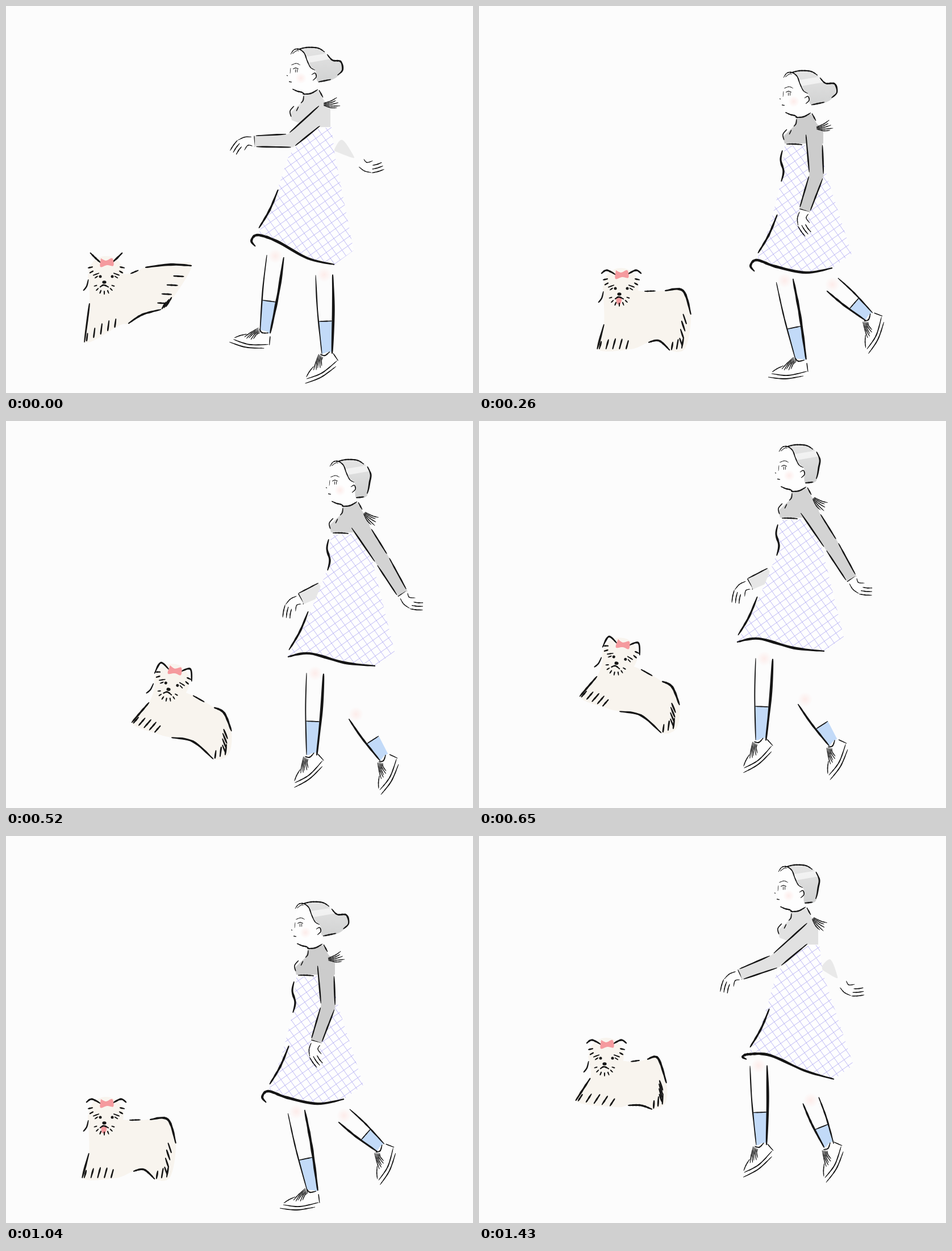
An HTML page with a canvas for the animation above (1.56 s loop, 822x681 px).

```html
<!DOCTYPE html>
<html lang="en">
<head>
<meta charset="utf-8">
<title>Walk</title>
<style>
html, body { margin: 0; width: 100%; height: 100%; overflow: hidden; background: #fcfcfc; }
canvas { display: block; width: 100vw; height: 100vh; }
</style>
</head>
<body>
<canvas width="822" height="681"></canvas>
<script>
const g = document.querySelector('canvas').getContext('2d');
const BLACK = '#151515', SKIN = '#fefefe', FUR = '#f8f4ee', PINK = '#f59a9e';
const RAD = Math.PI / 180;
const lerp = (a, b, t) => a + (b - a) * t;
const mix = (p, q, t) => [lerp(p[0], q[0], t), lerp(p[1], q[1], t)];
const add = (p, x, y) => [p[0] + x, p[1] + y];
const gray = v => `rgb(${v},${v},${v})`;

function at([x, y], deg, draw) {
  g.save();
  g.translate(x, y);
  g.rotate(deg * RAD);
  draw();
  g.restore();
}

// Catmull-Rom samples through the points
function spline(p, n = 9) {
  const get = i => p[Math.max(0, Math.min(p.length - 1, i))], out = [p[0]];
  for (let i = 0; i < p.length - 1; i++) {
    const [a, b, c, d] = [-1, 0, 1, 2].map(k => get(i + k));
    for (let k = 1; k <= n; k++) {
      const t = k / n;
      out.push([0, 1].map(j => b[j] + .5 * t * (c[j] - a[j] + t * (2 * a[j] - 5 * b[j] + 4 * c[j] - d[j]
        + t * (3 * (b[j] - c[j]) + d[j] - a[j])))));
    }
  }
  return out;
}

// Points at half a width to one side of a path
function side(pts, widths, s) {
  return pts.map(([x, y], i) => {
    const [ax, ay] = pts[Math.max(0, i - 1)], [bx, by] = pts[Math.min(pts.length - 1, i + 1)];
    const h = s * widths[i] / 2 / (Math.hypot(bx - ax, by - ay) || 1);
    return [x - (by - ay) * h, y + (bx - ax) * h];
  });
}

function fill(pts, color) {
  g.beginPath();
  pts.forEach(p => g.lineTo(...p));
  g.closePath();
  g.fillStyle = color;
  g.fill();
}

const blob = (pts, color) => fill(spline([...pts, pts[0]]), color);

// One tapered, slightly rough brush stroke
function ink(w, ...pts) {
  const p = spline(pts), last = p.length - 1;
  const widths = p.map((q, i) =>
    w * (.4 + .65 * Math.sin(Math.PI * i / last) ** .6) * (1 + .12 * Math.sin(i * 12.9 + q[0])));
  fill([...side(p, widths, 1), ...side(p, widths, -1).reverse()], BLACK);
}

function dot(x, y, rx, ry, color) {
  g.beginPath();
  g.ellipse(x, y, rx, ry, 0, 0, 7);
  g.fillStyle = color;
  g.fill();
}

function blush(x, y, r) {
  const c = g.createRadialGradient(x, y, 0, x, y, r);
  c.addColorStop(0, '#fdecea');
  c.addColorStop(1, '#fdecea00');
  dot(x, y, r, r, c);
}

// ---- the woman ----

// Back of the hair: hanging x y, blown x y
const LOCK = [[56, -28, 54, -28], [62, -14, 64, -18], [60, 0, 80, -17],
  [58, 12, 84, -2], [54, 25, 68, 14], [36, 27, 39, 20]];

function head(wind) {
  const lock = LOCK.map(([x, y, u, v]) => [lerp(x, u, wind), lerp(y, v, wind)]);
  blob([[-12, 8], [-5, -28], [20, -34], [36, 5], [34, 32], [10, 38], [-8, 33]], SKIN);
  blush(8, 14, 10);
  const c = g.createLinearGradient(0, -40, 0, 28);
  c.addColorStop(0, '#e4e4e4');
  c.addColorStop(1, '#cfd0d0');
  blob([[5, -36], [18, -40], [38, -39], ...lock, [34, 2], [24, -8], [17, -28]], c);
  g.globalAlpha = .6;
  fill([[19, -24], [56, -30], [61, -20], [21, -13]], '#fff');
  g.globalAlpha = 1;
  ink(2.2, [1, -36], [18, -40], [38, -39], [50, -32]);
  ink(2.8, ...lock.slice(0, 4), mix(lock[3], lock[4], .6));
  ink(2.2, lock[5], mix(lock[5], lock[4], .4), mix(lock[5], lock[4], .8));
  blob([[27, 8], [33, 4], [36, 12], [29, 19]], SKIN);
  ink(1.6, [27, 8], [33, 5], [35, 12], [29, 18]);
  ink(1.8, [-10, -28], [-4, -36], [5, -37], [14, -30], [19, -17], [25, -5], [33, 0]);
  ink(1, [-7, -29], [0, -34], [5, -34]);
  ink(1, [-9, -9], [0, -12], [7, -9]);
  ink(1.2, [-6, -2], [-1, -4], [4, -2]);
  [-1.5, 1.5].forEach(x => ink(.9, [x, -2], [x, 4]));
  ink(.8, [-10, -4], [-11, 6]);
  ink(1.3, [-17, 9], [-15, 10]);
  ink(1.5, [-13, 20], [-8, 21]);
  ink(2.2, [-7, 33], [2, 37], [10, 39], [15, 43]);
}

function bust(tone, bib) {
  const low = bib ? 88 : 100;
  fill([[13, 42], [39, 36], [48, 52], [60, 66], [60, low], [24, low], [-8, 88], [-11, 76], [8, 58]], tone);
  ink(2.2, [11, 42], [25, 41], [38, 34]);
  ink(1.6, [13, 45], [12, 53], [8, 58]);
  ink(2, [40, 35], [47, 48]);
  ink(1.8, [-4, 63], [-11, 72], [-9, 82]);
  ink(1.6, [4, 64], [0, 72]);
  if (bib) ink(2.2, [-5, 89], [10, 89], [23, 90]);
}

function knot() {
  for (let i = -2; i < 3; i++) {
    const a = i * 16 * RAD, r = 17 + i % 2 * 4;
    ink(1.5, [-9, i], [4, i * 3], [r * Math.cos(a), r * Math.sin(a) - 3]);
  }
}

function hand() {
  fill([[0, 9], [28, 6], [44, -11], [33, -19], [18, -10], [0, -9]], SKIN);
  ink(1.5, [4, 8], [16, 9], [28, 5]);
  ink(1.4, [4, -8], [12, -6], [19, -14]);
  for (let i = 0; i < 3; i++) ink(1.7, [29 - 3 * i, 5 - 6 * i], [37 - 4 * i, -3 - 5 * i], [44 - 5 * i, -12 - 4 * i]);
}

// Drawn from the ankle, toe to the left
function shoe() {
  at([9, 26], 0, () => {
    blob([[-64, 2], [-56, -10], [-38, -18], [-19, -29], [1, -24], [2, -3], [-30, 4]], SKIN);
    ink(1.8, [-67, 3], [-37, 6], [-5, 1]);
    ink(1.8, [-61, -3], [-32, 0], [1, -7]);
    ink(1.6, [-60, -6], [-51, -12], [-40, -17]);
    ink(1.6, [1, -22], [3, -6]);
    ink(2, [-20, -31], [-14, -25], [-3, -27]);
    for (let i = 0; i < 5; i++) {
      ink(1.5, [-43 + 4 * i, -11 + i % 2 * 2], [-35 + 3 * i, -20], [-22 + i, -32 + 2 * i]);
    }
  });
}

function hands(elbow, wrist) {
  at(wrist, Math.atan2(wrist[1] - elbow[1], wrist[0] - elbow[0]) / RAD - 5, hand);
}

function farArm(elbow, wrist) {
  const [l, r] = [1, -1].map(s => side([elbow, wrist], [24, 21], s));
  const front = wrist[0] < elbow[0];
  const end = mix(elbow, wrist, front ? 1 : .85);
  blob([l[0], mix(l[0], end, .8), mix(r[0], end, .8), r[0]], '#e9e9e9');
  if (front) {
    fill([...l, ...r.reverse()], '#e6e6e6');
    ink(2, ...l);
    ink(2.2, l[1], r[0]);
  }
  hands(elbow, wrist);
}

function nearArm(shoulder, elbow, wrist, tone) {
  const [l, r] = [1, -1].map(s => side([shoulder, elbow, wrist], [28, 25, 19], s));
  fill([...l, ...[...r].reverse()], tone);
  [l, r].forEach((p, i) => {
    ink(2.4, mix(p[0], p[1], i ? .2 : -.1), mix(p[0], p[1], .94));
    ink(2.4, mix(p[1], p[2], .06), mix(p[1], p[2], .95));
  });
  ink(2, l[2], r[2]);
  hands(elbow, wrist);
}

function leg([kx, ky, ax, ay, foot, lines = 2]) {
  const knee = [kx, ky], ankle = [ax, ay];
  const path = [knee, mix(knee, ankle, .45), ankle];
  const [l, r] = [1, -1].map(s => side(path, [30, 28, 18], s));
  const cut = p => mix(p[1], p[2], .25);
  const trailing = ax - kx > 30;
  if (lines) blush(kx, ky, 13);
  fill([cut(l), cut(r), r[2], l[2]], '#c2daf8');
  at(ankle, foot, shoe);
  if (lines > 0) {
    ink(trailing ? 3.4 : 2.1, ...l);
    ink(1.8, cut(l), cut(r));
  }
  if (lines > 1) ink(trailing ? 2.6 : 4.2, ...r);
}

// Checked cloth, lines along two crossed directions
function cloth(pts, x0, x1, edge) {
  fill(pts, SKIN);
  const c = g.createLinearGradient(x0, 0, x1, 0);
  c.addColorStop(.3, '#bbb6f4');
  c.addColorStop(1, edge);
  g.save();
  g.clip();
  g.strokeStyle = c;
  g.lineWidth = .9;
  at([530, 320], -35, () => {
    g.beginPath();
    for (let k = -300; k <= 300; k += 12.5) {
      g.moveTo(k, -300);
      g.lineTo(k, 300);
      g.moveTo(-300, k);
      g.lineTo(300, k);
    }
    g.stroke();
  });
  g.restore();
}

function dress({ eye, hem, curl, fold, edge = '#bbb6f4' }, bib) {
  const [lx, ly, rise, sag, rx, ry] = hem, left = [lx, ly], right = [rx, ry];
  const edgeLine = [left, add(mix(left, right, .25), 0, rise), add(mix(left, right, .65), 0, sag), right];
  const own = (x, y) => add(eye, x, y), waist = own(-13, 150);
  const top = bib ? [own(-8, 92), own(52, 90)] : [own(24, 105), own(62, 100)];
  const slope = spline([waist, mix(add(waist, 8, 0), left, .55), left]);
  cloth([...top, own(68, 150), add(right, 34, -25), ...spline(edgeLine).reverse(), ...slope.reverse()],
    lx, rx + 34, edge);
  if (bib) ink(3.5, own(-12, 100), own(-15, 117), own(-10, 137), own(-14, 155));
  if (fold) ink(3.4, add(left, 36, -80), add(left, 21, -44), add(left, 2, -12));
  if (curl) edgeLine.unshift(add(left, -4, curl), add(left, -11, curl * .5));
  ink(4.3, ...edgeLine);
}

// ---- the dog ----

const EARS = { up: [-30, -18, -20, -8], round: [-35, 12, -28, -9], flop: [-37, -2, -27, -8] };

// Ring from the bow: chest, front paw (2), belly (3), rear paw, rump, hip, back (2)
const BODIES = {
  run: [[-31, 71], [-40, 140], [22, 110], [37, 107], [62, 91], [95, 82], [106, 76], [149, 5], [112, 3], [67, 8], [41, 19]],
  step: [[-36, 64], [-33, 131], [-13, 135], [25, 125], [57, 125], [88, 129], [117, 127], [122, 79], [107, 26], [77, 31], [40, 30]],
  stand: [[-32, 87], [-44, 131], [15, 131], [46, 119], [65, 116], [84, 133], [111, 129], [121, 70], [107, 28], [75, 28], [39, 29]],
  leap: [[-46, 55], [-77, 91], [-30, 111], [-7, 117], [31, 124], [67, 155], [94, 146], [99, 106], [86, 74], [68, 64], [31, 43]],
  crouch: [[-30, 59], [-56, 99], [14, 110], [36, 107], [59, 107], [79, 114], [102, 103], [104, 68], [89, 24], [70, 26], [41, 30]]
};

// Short hairs along a line, each in the given direction
function tufts(a, b, n, [dx, dy]) {
  const len = Math.hypot(dx, dy);
  for (let i = 0; i < n; i++) {
    const p = mix(a, b, (i + .3) / n), r = (15 + 5 * Math.sin(i * 7)) / len;
    ink(2.7, p, add(p, dx * r, dy * r));
  }
}

function face(ear, tongue) {
  dot(-2, 20, 31, 32, FUR);
  const [ox, oy, mx, my] = EARS[ear];
  for (const s of [1, -1]) {
    const m = (x, y) => [s * (x + 1.5) - 1.5, y];
    ink(3, m(ox, oy), m(mx, my), m(-11, 0));
    ink(2.4, m(-34, 9), m(-25, 7));
    ink(2.4, m(-31, 18), m(-24, 14));
    ink(2, m(-25, 22), m(-14, 18));
    ink(2, m(-22, 27), m(-16, 23));
    dot(...m(-12, 24), 2.5, 2.5, BLACK);
  }
  ink(2.6, [-33, 29], [-36, 41], [-42, 49]);
  if (tongue) blob([[-11, 40], [-1, 40], [-3, 51], [-9, 51]], PINK);
  for (let a = 15; a < 180; a += 25) {
    const c = Math.cos(a * RAD), s = Math.sin(a * RAD);
    ink(2, [-5 + 13 * c, 36 + 13 * s], [-5 + 19 * c, 36 + 20 * s]);
  }
  ink(2.6, [-13, 43], [-6, 39], [3, 43]);
  dot(-5, 34, 3.6, 2.8, BLACK);
  blob([[-11, -8], [-2, -4], [9, -8], [11, 5], [0, 4], [-12, 7]], PINK);
}

function dog({ body, ear, tongue, tilt = 0 }, bow) {
  at(bow, 0, () => {
    const p = BODIES[body], toward = (i, j) => [p[j][0] - p[i][0], p[j][1] - p[i][1]];
    blob([[-34, 20], ...p], FUR);
    ink(2.4, p[10], mix(p[10], p[9], .55));
    ink(3.8, p[9], p[8], p[7]);
    ink(3.3, p[3], p[4], p[5]);
    ink(3.2, p[0], mix(p[0], p[1], .5), p[1]);
    tufts(p[1], p[2], 5, toward(1, 0));
    tufts(p[5], p[6], 3, toward(6, 7));
    tufts(add(p[6], -6, 0), add(p[7], -6, 8), 4, toward(7, 8));
  });
  at(bow, tilt, () => face(ear, tongue));
}

// ---- poses: joints on the stage ----
// arm, far: elbow and wrist; hem: left, rise, sag, right; legs: knee, ankle, foot angle, lines

const SKY = '#8fc3fb';
const POSES = [
  { eye: [511, 113], wind: .9, tone: 224, arm: [[501, 237], [437, 238]], far: [[584, 245], [622, 274]],
    hem: [443, 403, -2, 7, 578, 455], curl: 20, fold: 1, edge: SKY,
    legs: [[474, 440, 456, 575, 12], [560, 473, 565, 612, -27]],
    bow: [178, 452], body: 'run', ear: 'up' },
  { eye: [524, 154], wind: .8, tone: 211, arm: [[553, 306], [495, 341]],
    hem: [437, 419, -1, 5, 585, 466], curl: 24,
    legs: [[486, 477, 407, 607, 38], [580, 487, 629, 614, -38, 1]],
    bow: [193, 471], body: 'step', ear: 'flop', tongue: 1 },
  { eye: [562, 142], wind: 0, tone: 217, arm: [[622, 283], [620, 356]],
    hem: [488, 443, 7, 7, 641, 461], fold: 1,
    legs: [[591, 520, 590, 622, 0, 0], [545, 487, 613, 546, -79]],
    bow: [313, 475], body: 'stand', ear: 'round', tongue: 1 },
  { eye: [538, 82], wind: 0, tone: 211, arm: [[620, 218], [656, 278]], far: [[513, 270], [477, 287]],
    hem: [454, 389, -10, 0, 608, 405], fold: 1,
    legs: [[502, 418, 496, 562, -35], [574, 490, 624, 567, -58, 1]],
    bow: [254, 394], body: 'leap', ear: 'round', tilt: 12 },
  { eye: [490, 104], wind: .8, tone: 211, arm: [[576, 226], [610, 290]], far: [[470, 258], [423, 265]],
    hem: [421, 391, -7, 4, 562, 436], curl: 18, fold: 1,
    legs: [[447, 418, 436, 570, 10], [529, 460, 553, 609, -27]],
    bow: [146, 418], body: 'run', ear: 'up' },
  { eye: [519, 156], wind: 1, tone: 204, arm: [[567, 300], [546, 362]],
    hem: [462, 449, 8, 13, 595, 463], curl: 20, fold: 1,
    legs: [[595, 492, 660, 549, -62], [511, 485, 540, 626, 0]],
    bow: [178, 471], body: 'stand', ear: 'flop', tongue: 1 },
  { eye: [537, 91], wind: 0, tone: 225, arm: [[522, 220], [459, 244]], far: [[609, 225], [638, 258]],
    hem: [475, 384, -9, 0, 625, 428], curl: 9, fold: 1, edge: SKY,
    legs: [[492, 404, 497, 544, -34], [584, 465, 616, 545, -59]],
    bow: [226, 367], body: 'crouch', ear: 'flop' }
];

function woman(low, up, eye) {
  const placed = (p, draw) => at([eye[0] - p.eye[0], eye[1] - p.eye[1]], 0, draw);
  const [elbow, wrist] = up.arm, bib = elbow[0] > up.eye[0], tone = gray(up.tone);
  placed(low, () => low.legs.forEach(leg));
  placed(up, () => up.far && farArm(...up.far));
  placed(low, () => dress(low, bib));
  at(eye, 0, () => bust(tone, bib));
  placed(up, () => nearArm(add(up.eye, 44, 78), elbow, wrist, tone));
  at(eye, 0, () => {
    at([57, 60], 45 - 50 * up.wind, knot);
    head(up.wind);
  });
}

// Lower body, and where they differ: upper body, eye, bow of the dog
const BEAT = 130;
const BEATS = [[0], [1], [5, 5, [546, 154], [252, 473]], [2], [3, 3, [580, 108], [298, 440]], [3],
  [4], [1, 2, [500, 152], [124, 467]], [5], [2, 1, [542, 146], [240, 472]], [3, 6, [550, 112], [258, 428]], [6]];

let shown = -1;
function tick() {
  const i = Math.floor(performance.now() / BEAT) % BEATS.length;
  if (i !== shown) {
    shown = i;
    const [l, u = l, eye = POSES[l].eye, bow = POSES[l].bow] = BEATS[i];
    g.fillStyle = '#fcfcfc';
    g.fillRect(0, 0, 822, 681);
    dog(POSES[l], bow);
    woman(POSES[l], POSES[u], eye);
  }
  requestAnimationFrame(tick);
}
tick();
</script>
</body>
</html>
```
